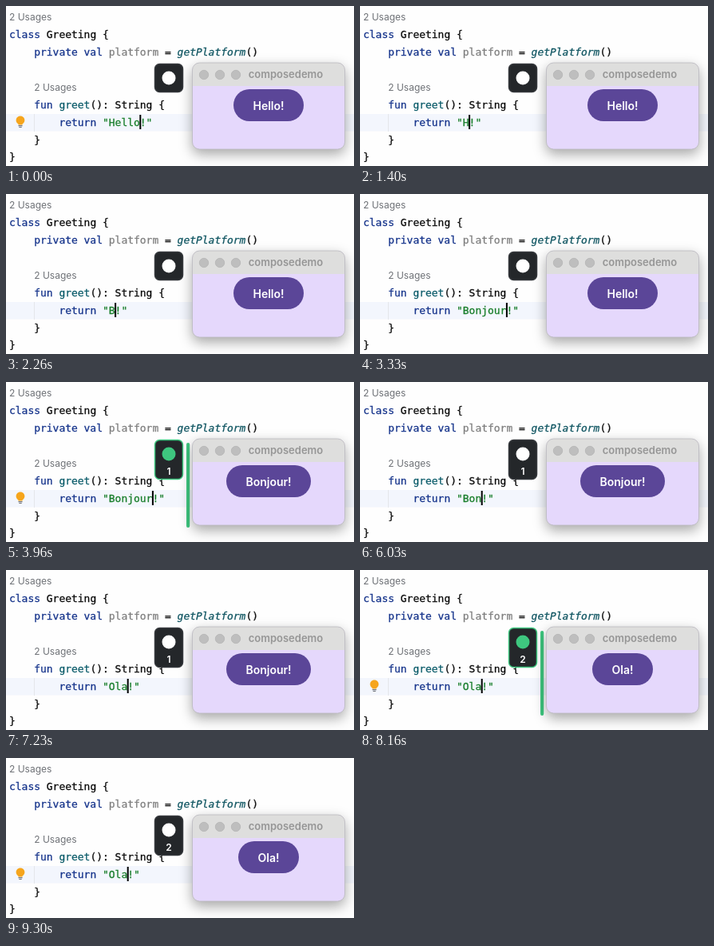
Animation, 436 px wide and 200 px high, one loop 9360 ms. Source, as an HTML page:

```html
<!DOCTYPE html>
<html lang="en">
<head>
<meta charset="utf-8">
<title>Hot reload greeting</title>
<style>
  html, body { margin: 0; width: 100%; height: 100%; overflow: hidden; background: #fefefe; }
  svg { display: block; width: 436px; height: 200px; }
  text { white-space: pre; }
  .code { font: 12.96px "DejaVu Sans Mono", monospace; color: #0c0c0c; }
  .code text, .code tspan { fill: currentColor; stroke: currentColor; stroke-width: .3px; }
  .hint { font: 12px Inter, sans-serif; fill: #6f7277; }
  .code .kw { color: #17358c; }
  .code .fn { color: #0d5d6b; }
  .code .call { color: #125763; font-style: italic; }
  .code .prop { color: #808080; }
  .code .str { color: #1a7f2c; }
  .ui { font-family: Inter, sans-serif; font-weight: 600; text-anchor: middle; }
  .window { filter: drop-shadow(0 6px 8px rgba(0, 0, 0, .34)); }
</style>
</head>
<body>
<svg viewBox="0 0 436 200">
  <rect y="135" width="436" height="21.5" fill="#f3f6fd"/>
  <path d="M35.500 135V157" stroke="#e4e6ea"/>

  <text class="hint" x="4" y="18">2 Usages</text>
  <text class="hint" x="35.2" y="106">2 Usages</text>
  <g class="code">
    <text x="4" y="40"><tspan class="kw">class</tspan> Greeting {</text>
    <text x="35.2" y="62"><tspan class="kw">private val</tspan> <tspan class="prop">platform</tspan> = <tspan class="call">getPlatform</tspan>()</text>
    <text x="35.2" y="128"><tspan class="kw">fun</tspan> <tspan class="fn">greet</tspan>(): String {</text>
    <text x="66.4" y="150"><tspan class="kw">return</tspan> <tspan class="str" id="literal">"Hello!"</tspan></text>
    <text x="35.2" y="171.5">}</text>
    <text x="4" y="193">}</text>
  </g>
  <rect id="caret" y="136" width="2" height="18" fill="#000"/>

  <g id="bulb">
    <path d="M15.4 147.5C10.500 144.500 12.500 137.500 18 137.500S25.500 144.500 20.600 147.500V148.500H15.400Z" fill="#f6a51c"/>
    <path d="M15.500 149.700H20.500M16.300 151.500H19.700" stroke="#70737a" stroke-width="1.2"/>
  </g>

  <rect id="bar" width="4.2" rx="2"/>

  <g class="window">
    <rect x="233.500" y="71" width="191" height="108" rx="9" fill="#e5d8fc"/>
    <path d="M233.500 100V80a9 9 0 0 1 9-9h173a9 9 0 0 1 9 9v20Z" fill="#dededd"/>
    <rect x="233.500" y="71" width="191" height="108" rx="9" fill="none" stroke="#b9b8bd" stroke-width=".8"/>
  </g>
  <g fill="#bebebe" stroke="#b0b0b0" stroke-width=".7">
    <circle cx="248" cy="86" r="5.700"/>
    <circle cx="268" cy="86" r="5.700"/>
    <circle cx="288" cy="86" r="5.700"/>
  </g>
  <text class="ui" x="350.500" y="90" font-size="13" font-weight="700" fill="#969696">composedemo</text>
  <rect id="button" y="104" height="40" rx="20" fill="#5b4698"/>
  <text class="ui" id="label" x="329" y="129.500" font-size="14" fill="#fff"></text>

  <rect id="panel" x="186.500" y="72.500" width="35" rx="6" fill="#24272a" stroke-width="1.500"/>
  <circle id="status" cx="204" cy="90" r="8.500"/>
  <text class="ui" id="count" x="204" y="116" font-size="12" fill="#fff"></text>
</svg>

<script>
const LOOP = 9360, KEY = 150, BULB_DELAY = 400;
const HOLD = 1200, FADE = 250;
const GREEN = [62, 199, 127], WHITE = [255, 255, 255], GREY = [168, 168, 168], DARK = [54, 57, 61];

const edits = [
  { from: "Hello", to: "Bonjour", erase: 900, type: 2150 },
  { from: "Bonjour", to: "Ola", erase: 5500, type: 6750 }
];
const reloads = [
  { at: 0, word: "Hello", width: 88 },
  { at: 3750, word: "Bonjour", width: 106 },
  { at: 7800, word: "Ola", width: 76 }
];

const $ = id => document.getElementById(id);
const clamp = v => Math.min(1, Math.max(0, v));
const mix = (a, b, p) => `rgb(${a.map((v, i) => Math.round(v + (b[i] - v) * clamp(p)))})`;
const set = (id, attrs) => Object.entries(attrs).forEach(([k, v]) => $(id).setAttribute(k, v));
const keys = (t, start) => Math.max(0, Math.floor((t - start) / KEY) + 1);

function typedWord(t) {
  const edit = edits.findLast(e => t >= e.erase);
  if (!edit) return edits[0].from;
  if (t >= edit.type) return edit.to.slice(0, keys(t, edit.type));
  return edit.from.slice(0, Math.max(0, edit.from.length - keys(t, edit.erase)));
}

function drawEditor(t) {
  const word = typedWord(t);
  const editing = edits.some(e =>
    t >= e.erase && t < e.type + (e.to.length - 1) * KEY + BULB_DELAY);
  $("literal").textContent = `"${word}!"`;
  set("caret", { x: 4 + 7.8 * (16 + word.length) - 0.5 });
  set("bulb", { visibility: editing ? "hidden" : "visible" });
}

function drawApp(t) {
  const index = reloads.findLastIndex(r => t >= r.at);
  const { at, word, width } = reloads[index];
  const fade = index ? clamp((t - at - HOLD) / FADE) : 1;
  const grow = index > 1 ? 1 : index ? clamp((t - at) / 150) : 0;

  $("label").textContent = word + "!";
  set("button", { x: 329 - width / 2, width });
  $("count").textContent = grow === 1 ? index : "";
  set("panel", { height: 35 + 14 * grow, stroke: mix(GREEN, DARK, fade * 4) });
  set("status", { fill: mix(GREEN, WHITE, fade * 1.4) });
  set("bar", {
    x: 226 + 11 * fade,
    y: 76 + 9 * fade,
    height: 106 - 9 * fade,
    fill: mix(GREEN, GREY, fade * 4),
    visibility: fade < 1 ? "visible" : "hidden"
  });
}

function frame() {
  const t = performance.now() % LOOP;
  drawEditor(t);
  drawApp(t);
  requestAnimationFrame(frame);
}
frame();
</script>
</body>
</html>
```
